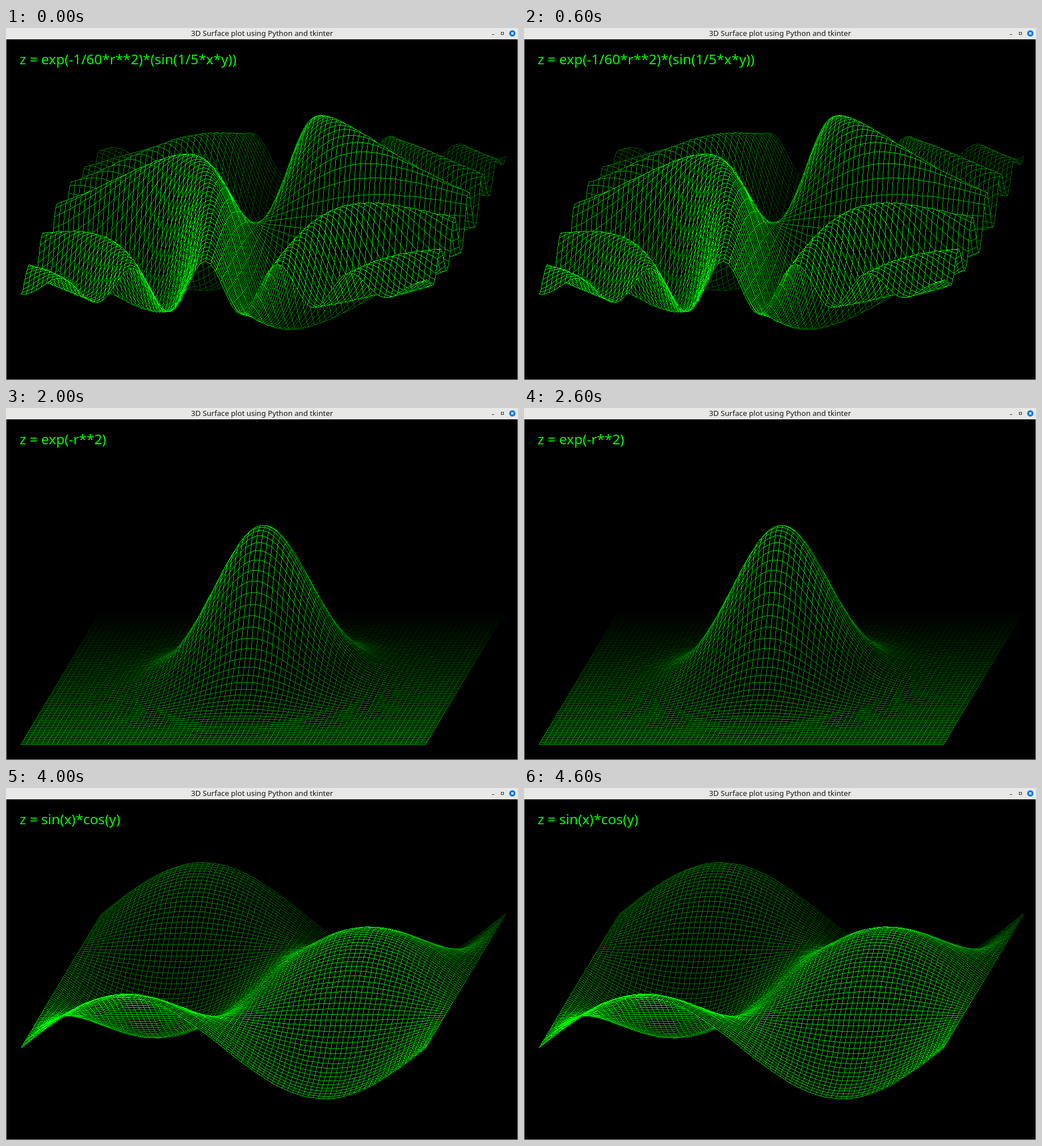
An HTML page with a canvas for the animation above (5000 ms loop, 902 by 621 pixels).

```html
<!DOCTYPE html>
<html lang="en">
<head>
<meta charset="utf-8">
<title>3D Surface plot</title>
<style>
  html, body { margin: 0; width: 100%; height: 100%; overflow: hidden; background: #000; }
  canvas, svg { position: absolute; left: 0; top: 0; display: block; }
  text { font-family: "Noto Sans", "Open Sans", sans-serif; }
</style>
</head>
<body>
<canvas id="plot" width="902" height="621"></canvas>
<svg width="902" height="621" viewBox="0 0 902 621">
  <path d="M0.5 20V620.5H901.5V20" fill="none" stroke="#9c9c9c"/>
  <rect width="902" height="20" fill="#e8e9e7"/>
  <text x="451" y="14" font-size="13.15" text-anchor="middle" fill="#161616">3D Surface plot using Python and tkinter</text>
  <path d="M856 11.5h4" stroke="#333"/>
  <rect x="872.5" y="7.5" width="4" height="4" fill="none" stroke="#333"/>
  <circle cx="892" cy="9.5" r="5.5" fill="#0b76dc"/>
  <path d="M890 7.5l4 4m0-4l-4 4" stroke="#fff" stroke-width="1.3"/>
  <text id="formula" x="24" y="64" font-size="24.4" fill="#00ff00"></text>
</svg>
<script>
const W = 902, H = 621, N = 79, HOLD = 1000;
const ctx = document.getElementById("plot").getContext("2d");
const label = document.getElementById("formula");
const { sin, cos, exp, hypot, PI, round, min, max, abs, ceil, floor } = Math;

// half: range of x and y, lo..hi: range of the z axis
const surfaces = [
  { text: "z = exp(-1/60*r**2)*(sin(1/5*x*y))", half: 3 * PI, lo: -0.7, hi: 0.7,
    z: (x, y, r) => exp(-r * r / 60) * sin(x * y / 5) },
  { text: "z = sin(r)", half: 3 * PI, lo: -1, hi: 1, z: (x, y, r) => sin(r) },
  { text: "z = exp(-r**2)", half: 3, lo: 0, hi: 1, z: (x, y, r) => exp(-r * r) },
  { text: "z = sin(r)/r", half: 4 * PI, lo: -0.1, hi: 1, z: (x, y, r) => sin(r) / r },
  { text: "z = sin(x)*cos(y)", half: PI, lo: -1.5, hi: 1.5, z: (x, y) => sin(x) * cos(y) }
];

const BLACK = 0xff000000;

function fillQuad(buf, pts) {
  const ys = pts.map(p => p.y);
  for (let y = min(...ys); y < max(...ys); y++) {
    const hits = [];
    pts.forEach((a, i) => {
      const b = pts[(i + 1) % 4];
      if ((a.y <= y) !== (b.y <= y)) hits.push(a.x + (y - a.y) * (b.x - a.x) / (b.y - a.y));
    });
    hits.sort((a, b) => a - b);
    for (let i = 0; i + 1 < hits.length; i += 2)
      buf.fill(BLACK, y * W + ceil(hits[i]), y * W + ceil(hits[i + 1]));
  }
}

// always runs downwards, so an edge shared by two quads covers the same pixels
function drawLine(buf, a, b, color) {
  if (a.y > b.y || (a.y === b.y && a.x > b.x)) [a, b] = [b, a];
  let { x, y } = a;
  const dx = abs(b.x - x), dy = y - b.y;
  const sx = x < b.x ? 1 : -1;
  let err = dx + dy;
  for (;;) {
    buf[y * W + x] = color;
    if (x === b.x && y === b.y) return;
    const e = 2 * err;
    if (e >= dy) { err += dy; x += sx; }
    if (e <= dx) { err += dx; y++; }
  }
}

function render(s) {
  const image = ctx.createImageData(W, H);
  const buf = new Uint32Array(image.data.buffer).fill(BLACK);
  const step = 2 * s.half / N;

  const point = (i, j) => {
    const x = -s.half + i * step, y = -s.half + (j + 1) * step;
    const level = (s.z(x, y, hypot(x, y)) - s.lo) / (s.hi - s.lo);
    return {
      x: round(26 + 712.6 * i / N + 141.6 * j / N),
      y: round(593 - 237 * j / N - 270 * level),
      level
    };
  };
  const grid = Array.from({ length: N + 1 }, (_, j) =>
    Array.from({ length: N + 1 }, (_, i) => point(i, j)));

  // painter's order: far rows first
  for (let j = N - 1; j >= 0; j--) {
    for (let i = 0; i < N; i++) {
      const quad = [grid[j][i], grid[j][i + 1], grid[j + 1][i + 1], grid[j + 1][i]];
      const level = quad.reduce((sum, p) => sum + p.level, 0) / 4;
      const green = round(max(0, min(255, 175 * (1 - (j + 0.5) / N) + 150 * level)));
      fillQuad(buf, quad);
      quad.forEach((p, k) => drawLine(buf, p, quad[(k + 1) % 4], BLACK + green * 256));
    }
  }
  return image;
}

const images = surfaces.map(render);
const start = performance.now();
let shown = -1;

function tick() {
  const k = floor((performance.now() - start) / HOLD) % surfaces.length;
  if (k !== shown) {
    shown = k;
    ctx.putImageData(images[k], 0, 0);
    label.textContent = surfaces[k].text;
  }
  requestAnimationFrame(tick);
}
tick();
</script>
</body>
</html>
```
